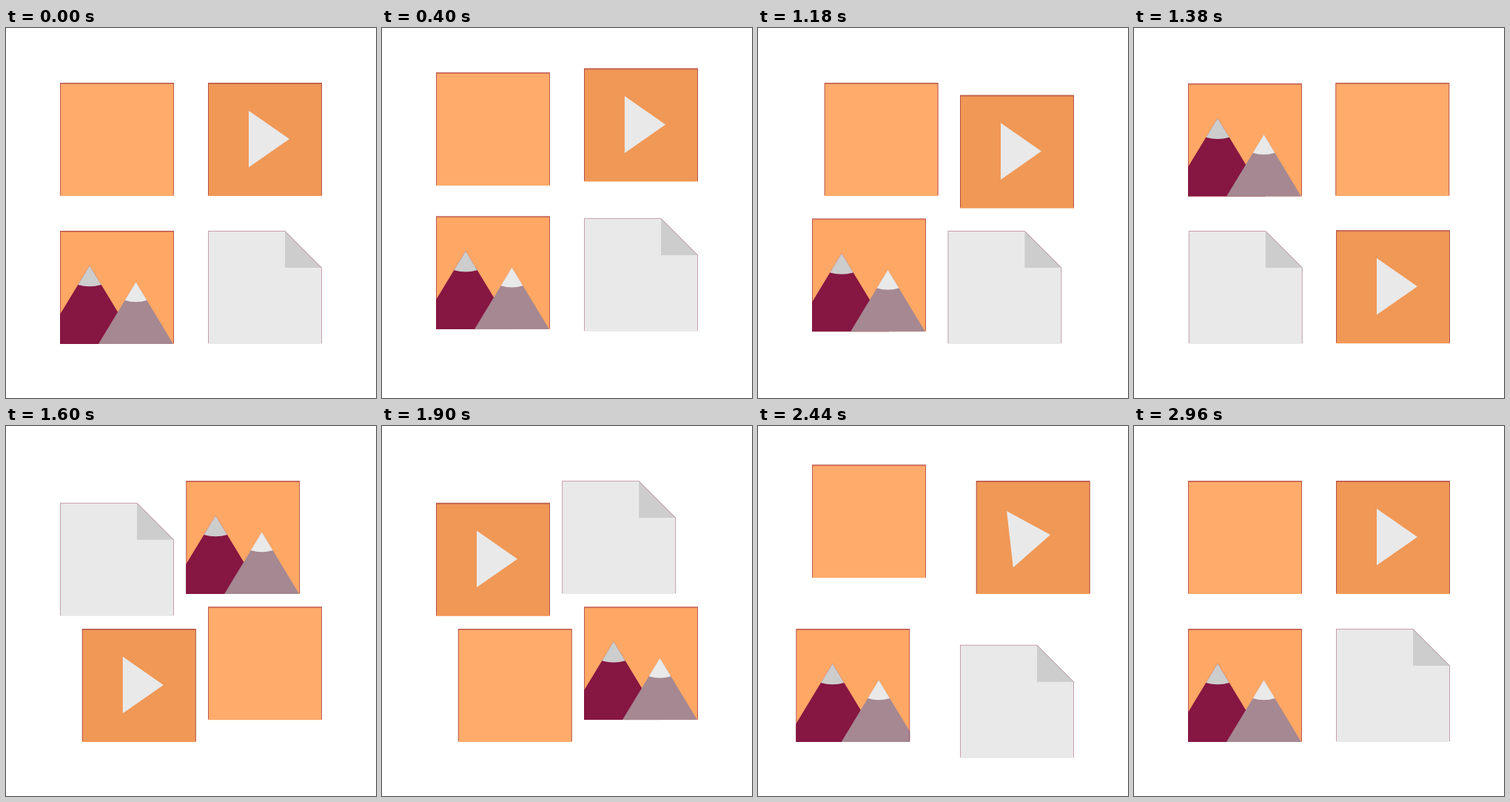
Recreate the animation shown at these times as an HTML page with a canvas. Size 500x500 px, loop 3000 ms.

```html
<!DOCTYPE html>
<html lang="en">
<head>
<meta charset="utf-8">
<title>Four tiles</title>
<style>
  html, body { margin: 0; width: 100%; height: 100%; overflow: hidden; background: #fff; }
  canvas { display: block; width: 500px; height: 500px; }
</style>
</head>
<body>
<canvas id="stage" width="500" height="500"></canvas>
<script>
const ctx = document.getElementById('stage').getContext('2d');
const LOOP = 3000, TICK = 20;
const W = 154, H = 153, GAP = 200, BEAT = 300, STAGGER = 200 / 3;
const MAROON = '#861642', PALE = '#e9e9e9', GREY = '#cdcdcd';

// Ring of cells, clockwise from top left, with the direction of travel from each.
const CELLS = [[73, 74], [273, 74], [273, 274], [73, 274]];
const DIRS = [[1, 0], [0, 1], [-1, 0], [0, -1]];

// Cubic bezier (.65, 0, .35, 1)
function ease(x) {
  let lo = 0, hi = 1;
  for (let i = 0; i < 24; i++) {
    const s = (lo + hi) / 2, r = 1 - s;
    if (1.95 * r * r * s + 1.05 * r * s * s + s * s * s < x) lo = s; else hi = s;
  }
  return lo * lo * (3 - 2 * lo);
}

// Eased value from a list of [time, value] steps.
function track(steps, t) {
  if (t <= steps[0][0]) return steps[0][1];
  for (let i = 1; i < steps.length; i++) {
    const [t0, v0] = steps[i - 1], [t1, v1] = steps[i];
    if (t < t1) return v0 + (v1 - v0) * ease((t - t0) / (t1 - t0));
  }
  return steps[steps.length - 1][1];
}

const HOP = [[0, 0], [BEAT, -20], [2 * BEAT, 20], [3 * BEAT, 0]];
const PULSE = [[BEAT, 0], [2 * BEAT, 1], [3 * BEAT, 0]];
const RIDE = [[1100, 0], [1400, 200], [1700, 400], [2000, 600], [2258, 830], [2700, 800]];
const SLIP = [[2258, 0], [2600, 1], [2960, 0]];

function fillPath(color, points) {
  ctx.fillStyle = color;
  ctx.beginPath();
  points.forEach(([x, y]) => ctx.lineTo(x, y));
  ctx.closePath();
  ctx.fill();
}

function edge(points, alpha) {
  ctx.globalAlpha = alpha;
  ctx.strokeStyle = MAROON;
  ctx.lineWidth = 1;
  ctx.beginPath();
  points.forEach(([x, y]) => ctx.lineTo(x, y));
  ctx.stroke();
  ctx.globalAlpha = 1;
}

function square(color) {
  ctx.fillStyle = color;
  ctx.fillRect(0, 0, W, H);
}

function squareEdge() {
  edge([[0.5, H - 1], [0.5, 0.5], [W - 0.5, 0.5], [W - 0.5, H - 1]], 0.55);
  edge([[1, 1.5], [W - 1, 1.5]], 0.3);
}

function plain() {
  square('#ffab6b');
  squareEdge();
}

function play(pulse, slip) {
  square('#f09856');
  ctx.save();
  ctx.translate(82.5 - 16 * slip, 76);
  ctx.rotate(-11 * slip * Math.PI / 180);
  ctx.scale(1 + 0.4 * pulse, 1 + 0.4 * pulse);
  fillPath(PALE, [[-27.5, -38.3], [27.5, 0], [-27.5, 38.3]]);
  ctx.restore();
  squareEdge();
}

function mountain(x, height, capHeight, scale, body, cap) {
  const slope = 1.65, half = height / slope, capHalf = capHeight / slope;
  ctx.save();
  ctx.translate(x, H);
  ctx.scale(scale, scale);
  fillPath(body, [[-half, 0], [0, -height], [half, 0]]);
  ctx.fillStyle = cap;
  ctx.beginPath();
  ctx.moveTo(0, -height);
  ctx.lineTo(capHalf, capHeight - height);
  ctx.quadraticCurveTo(0, capHeight - height + 4.5, -capHalf, capHeight - height);
  ctx.fill();
  ctx.restore();
}

function mountains(pulse, slip) {
  ctx.save();
  ctx.beginPath();
  ctx.rect(0, 0, W, H);
  ctx.clip();
  square('#ffa765');
  const dx = 16 * slip;
  mountain(40 + dx, 106, 26, 1 - 0.255 * pulse, MAROON, GREY);
  mountain(102.5 + dx, 83.5, 24.5, 1 - 0.165 * pulse, '#a58892', PALE);
  ctx.restore();
  squareEdge();
}

function page() {
  const fold = 50, x = W - fold;
  fillPath(PALE, [[0, 0], [x, 0], [W, fold], [W, H], [0, H]]);
  fillPath(GREY, [[x, 0], [W, fold], [x, fold]]);
  edge([[0.5, H - 1], [0.5, 0.5], [x, 0.5], [W - 0.5, fold], [W - 0.5, H - 1]], 0.35);
}

const TILES = [
  { cell: 0, order: 0, draw: plain },
  { cell: 1, order: 1, draw: play },
  { cell: 3, order: 2, draw: mountains },
  { cell: 2, order: 3, draw: page }
];

function render(t) {
  ctx.fillStyle = '#fff';
  ctx.fillRect(0, 0, 500, 500);
  const dist = track(RIDE, t), slip = track(SLIP, t);
  const leg = Math.min(3, Math.floor(dist / GAP)), along = dist - leg * GAP;
  for (const { cell, order, draw } of TILES) {
    const local = t - order * STAGGER, at = (cell + leg) % 4;
    const [x, y] = CELLS[at], [dx, dy] = DIRS[at];
    ctx.save();
    ctx.translate(x + dx * along, y + dy * along + track(HOP, local));
    draw(track(PULSE, local), slip);
    ctx.restore();
  }
}

const start = performance.now();
function loop() {
  const t = (performance.now() - start) % LOOP;
  render(Math.floor(t / TICK) * TICK);
  requestAnimationFrame(loop);
}
loop();
</script>
</body>
</html>
```
